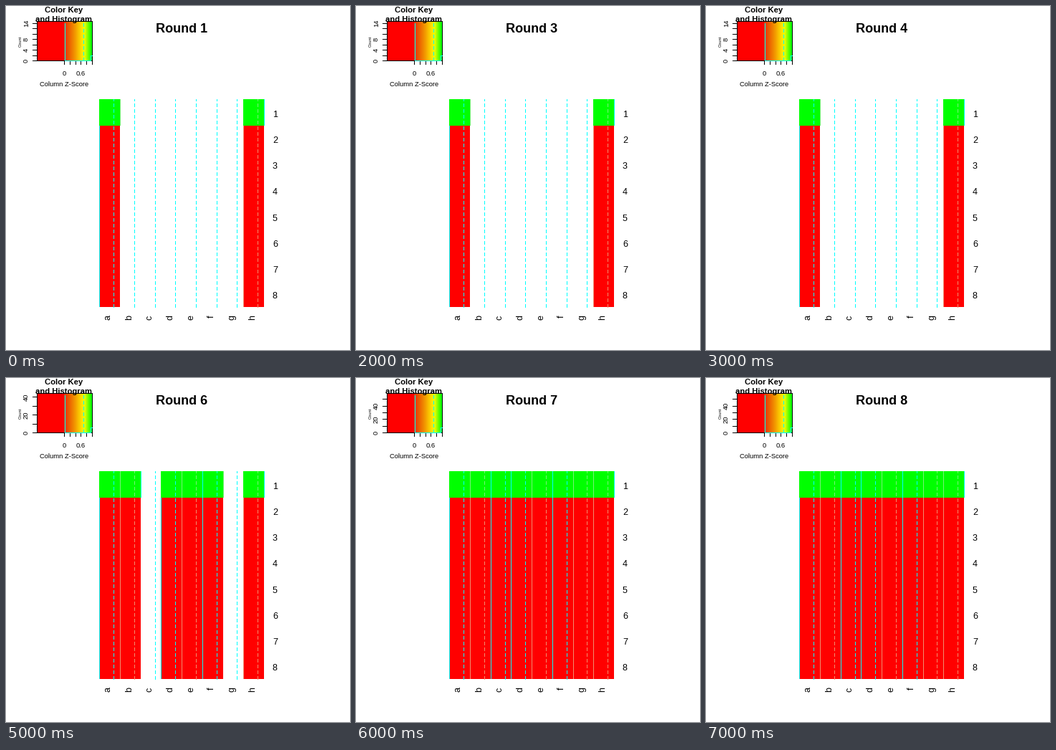
A matplotlib script for the animation above (8000 ms loop, 480x480 px).

```python
import matplotlib.pyplot as plt
from matplotlib.animation import FuncAnimation
from matplotlib.colors import LinearSegmentedColormap
from matplotlib.patches import Rectangle

SIZE, DPI = 480, 80
RED, GREEN, CYAN = "#ff0000", "#00ff00", "#00ffff"
SOFT_RED, SOFT_GREEN = "#f08c6e", "#78f078"

COLS = "abcdefgh"
SOFT_COLS = {1, 4, 6, 7}          # columns whose lines look faded on colour
TOP, SPLIT, BOTTOM = 130, 167, 420
KEY_BASE, KEY_HEIGHT = 76, 52.5   # zero line and tallest bar of the key

KEY_RAMP = LinearSegmentedColormap.from_list("key", [
    (0, "#e63200"), (0.35, "#f08c00"), (0.65, "#ffe600"),
    (0.75, "#e6ff00"), (1, GREEN)])

# per round: filled columns, tick step, labelled counts
EARLY = ("ah", 2, (0, 4, 8, 14))
ROUNDS = [EARLY] * 4 + [
    ("abfh", 5, (0, 10, 20)),
    ("abdefh", 10, (0, 20, 40)),
    (COLS, 10, (0, 20, 40)),
    (COLS, 10, (0, 20, 40))]

plt.rcParams["font.family"] = "Liberation Sans"
fig = plt.figure(figsize=(SIZE / DPI, SIZE / DPI), dpi=DPI, facecolor="white")
ax = fig.add_axes([0, 0, 1, 1])


def box(x, y, w, h, color):
    ax.add_patch(Rectangle((x, y), w, h, fc=color, lw=0, antialiased=False))


def label(x, y, text, px, ha="center", angle=0, weight="normal"):
    ax.text(x, y, text, fontsize=px * 72 / DPI, ha=ha, va="baseline",
            rotation=angle, rotation_mode="anchor", weight=weight)


def edge(i):
    return int(130.5 + 28.75 * i)


def draw_key(count, step, marks):
    box(43, 21, 38, 55, RED)
    for x in range(81, 120):
        box(x, 21, 1, 55, KEY_RAMP((x - 81) / 38))

    # frame and axes
    box(43, 21, 78, 1, "black")
    box(43, 76, 78, 1, "black")
    box(43, 21, 1, 56, "black")
    box(120, 21, 1, 56, "black")
    for i in range(6):
        box(round(81 + 7.8 * i), 76, 1, 6, "black")
    for value in range(0, count + 1, step):
        y = int(KEY_BASE - KEY_HEIGHT * value / count + 0.5)
        box(37, y, 6, 1, "black")
    for value in marks:
        y = KEY_BASE - KEY_HEIGHT * value / count
        label(31, y + 0.5, str(value), 9.4, angle=90)

    # histogram outline and centre line
    box(82, 24, 1, 52, CYAN)
    box(82, 76, 37, 1, CYAN)
    box(118, 69, 1, 8, CYAN)
    box(118, 69, 3, 1, CYAN)
    for y in range(24, 76, 8):
        box(108, y, 1, 5, CYAN)

    label(81, 97, "0", 9.4)
    label(104, 97, "0.6", 9.4)
    label(81, 112, "Column Z-Score", 9.4)
    label(22, 49, "Count", 5.8, angle=90)
    label(80.5, 9, "Color Key", 11.3, weight="bold")
    label(80.5, 22, "and Histogram", 11.3, weight="bold")


def draw_map(filled):
    for i, name in enumerate(COLS):
        if name in filled:
            x, width = edge(i), edge(i + 1) - edge(i)
            box(x, TOP, width, SPLIT - TOP, GREEN)
            box(x, SPLIT, width, BOTTOM - SPLIT, RED)

    for i, name in enumerate(COLS):
        on = name in filled
        if on:
            low = SOFT_RED if i in SOFT_COLS else CYAN
            high = SOFT_GREEN if i + 1 in SOFT_COLS else CYAN
            box(edge(i), SPLIT, 1, BOTTOM - SPLIT, low)
            box(edge(i + 1), TOP, 1, SPLIT - TOP, high)
        x = int(150.6 + 28.7 * i)
        for y in range(BOTTOM - 4, TOP - 5, -8):
            color = CYAN
            if on and i in SOFT_COLS:
                color = SOFT_GREEN if y < SPLIT else SOFT_RED
            start = max(y, TOP)
            box(x, start, 1, y + 5 - start, color)
        label(146 + 28.75 * i, 431.5, name, 12.5, ha="right", angle=90)
        label(372, 155 + 36.15 * i, str(i + 1), 12.5, ha="left")


def draw(n):
    ax.clear()
    ax.set(xlim=(0, SIZE), ylim=(SIZE, 0))
    ax.axis("off")
    filled, step, marks = ROUNDS[n]
    draw_key(7 * len(filled), step, marks)
    draw_map(filled)
    label(245, 37, f"Round {n + 1}", 18, weight="bold")
    return []


anim = FuncAnimation(fig, draw, frames=len(ROUNDS), interval=1000,
                     init_func=lambda: [], repeat=True, repeat_delay=0)
plt.show()
```
